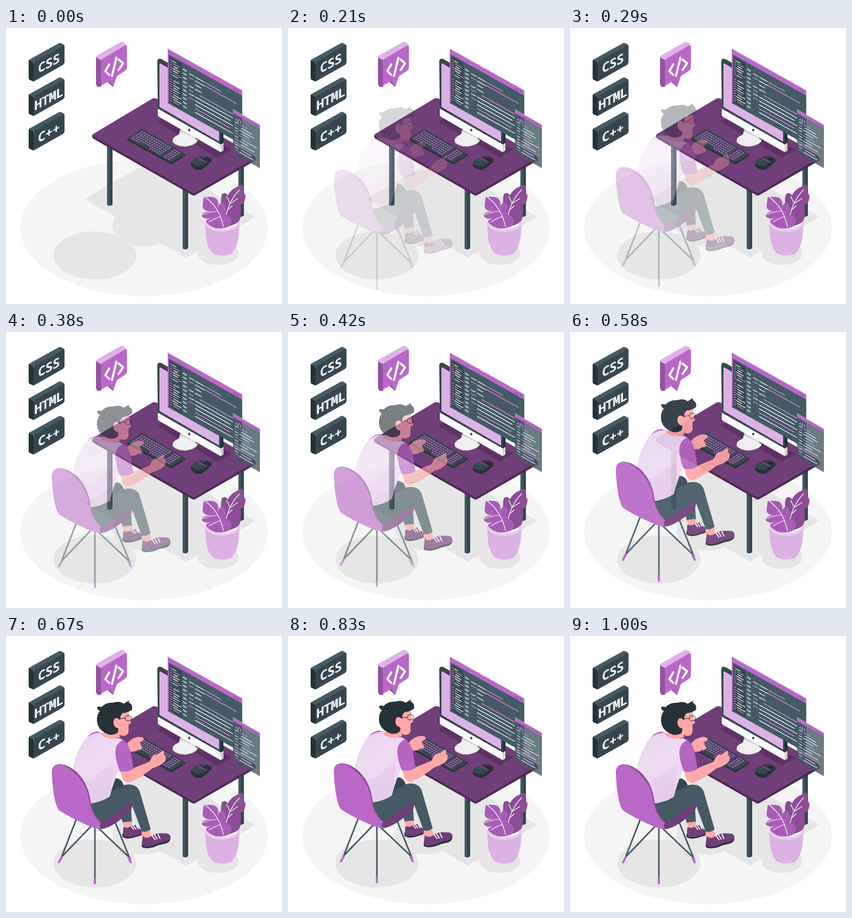
Recreate the animation shown at these times as an HTML page. Size 500 px wide and 500 px high, loop 1.04 s.

```html
<!DOCTYPE html>
<html lang="en">
<head>
<meta charset="utf-8">
<title>Programmer at a desk</title>
<style>
html, body { margin: 0; width: 100%; height: 100%; overflow: hidden; background: #fff; }
svg { display: block; width: 100%; height: 100%; }
.label { font: 900 23px "Noto Sans Mono", "DejaVu Sans Mono", monospace; letter-spacing: -.8px; fill: #fff; text-anchor: middle; }
.line { fill: none; stroke-linecap: round; stroke-linejoin: round; }
</style>
</head>
<body>
<svg viewBox="0 0 500 500">
  <defs>
    <linearGradient id="shirt" x1="0" y1="0" x2=".4" y2="1">
      <stop offset="0" stop-color="#e8d2ed"/><stop offset=".5" stop-color="#eedcf2"/><stop offset="1" stop-color="#ead5ef"/>
    </linearGradient>
    <g id="slab">
      <path fill="#263238" d="M41 60Q41 57 43 58L50 62V97L43 94Q41 93 41 91Z"/>
      <path fill="#455a64" d="M41 58L95 28Q98 26 101 28L106 31L50 63Z"/>
      <path fill="#37474f" d="M50 65Q50 62 53 60L103 32Q106 30 106 33V62Q106 65 103 67L50 97Z"/>
    </g>
    <g id="leg">
      <path fill="#37474f" d="M0 0H10V109Q5 113 0 109Z"/>
      <path fill="#455a64" d="M0 0H4V111Q2 111 0 109Z"/>
    </g>
  </defs>

  <ellipse cx="250" cy="362" rx="224" ry="124" fill="#f5f5f5"/>
  <g fill="#e6e6e6">
    <path d="M142 310L266 238L452 342L326 416Z"/>
    <ellipse cx="250" cy="358" rx="57" ry="38"/>
    <ellipse cx="161" cy="412" rx="75" ry="43.5"/>
    <ellipse cx="384" cy="408" rx="37" ry="21.5"/>
  </g>

  <use href="#slab"/><use href="#slab" y="62.5"/><use href="#slab" y="125"/>
  <g class="label">
    <text transform="translate(77.500 72) skewY(-28)">CSS</text>
    <text transform="translate(77.500 136) skewY(-28)">HTML</text>
    <text transform="translate(77.500 198) skewY(-28)">C++</text>
  </g>

  <g id="bubble">
    <path fill="#9552a0" d="M163 53L173 58V106L168 107Q163 105 163 101ZM184 98L194 107L198 92L190 92Z"/>
    <path fill="#dcb3e3" d="M163 53Q163 51 166 49L207 26Q210 24 213 26L218 29L173 57Z"/>
    <path fill="#ba68c8" d="M172 61Q172 57 176 55L214 32Q219 29 219 34V71Q219 75 215 78L201 87L194 107L187 96L173 104Q169 107 170 106Q172 104 172 102Z"/>
    <path class="line" stroke="#fff" stroke-width="3.800" d="M187 66L180 78L187 85M200 54L192 87M204 57L212 64L204 76"/>
  </g>

  <g id="desk">
    <use href="#leg" x="183" y="211"/>
    <use href="#leg" x="320" y="290"/>
    <use href="#leg" x="421" y="231"/>
    <path fill="#4a2a50" d="M156 194V197Q156 199 159 201L336 302Q340 305 344 302L452 240V233Z"/>
    <path fill="#703e78" d="M158 192L265 128Q269 126 273 128L450 231Q454 234 450 236L344 298Q340 300 336 298L158 196Q155 194 158 192Z"/>
    <path fill="#5d3265" d="M272 169L290 160L408 220L384 235Z"/>
  </g>

  <g id="monitor">
    <path fill="#e0e0e0" d="M302 203V207Q308 214 324 215Q345 212 347 203Z"/>
    <path fill="#f0f0f0" d="M302 203Q302 198 313 193L317 181L345 196L342 200Q350 203 345 207Q334 213 324 213Q306 212 302 203Z"/>
    <path fill="#d5d5d5" d="M317 181L345 196L342 201Q332 194 315 188Z"/>
    <path fill="#263238" d="M388 190L394 186V209L388 212Z"/>
    <path fill="#37474f" d="M274 60Q275 54 281 56L389 118V210L275 147Z"/>
    <path fill="#dbb2e3" d="M278 66Q278 63 281 65L386 125V207L278 146Z"/>
    <path class="line" stroke="#37474f" stroke-width="3" d="M277 144L387 208"/>
    <path fill="#fafafa" d="M275 146L389 211V225L279 162Q275 160 275 157Z"/>
    <path fill="#d0d0d0" d="M389 211L394 208V222L389 225Z"/>
    <circle cx="332" cy="185" r="2" fill="#263238"/>
  </g>

  <g id="editor" transform="matrix(1 .560 0 1 293 38)">
    <path fill="#455a64" d="M0 0H135V98H0Z"/>
    <path fill="#37474f" d="M3 12H25V46H3ZM3 48H25V95H3Z"/>
    <path fill="#ba68c8" d="M0 0H135V9H2V96H0Z"/>
    <path fill="#d79fe0" d="M0 -1H134L135 0H0Z"/>
    <path class="line" stroke="#6f3d78" stroke-width="2.200" d="M120 5h.1M124 5h.1M128 5h.1"/>
  </g>
  <g id="popup" transform="matrix(1 .571 0 1 411 148)">
    <path fill="#455a64" fill-opacity=".8" d="M0 0H49V78H0Z"/>
    <path fill="#ba68c8" d="M0 0H49V6H0Z"/>
    <path fill="#d79fe0" d="M0 -1H49V0H0Z"/>
    <path class="line" stroke="#6f3d78" stroke-width="1.600" d="M38 3.500h.1M41.500 3.500h.1M45 3.500h.1"/>
    <path class="line" stroke="#dbb2e3" stroke-width="1" d="M7 13l-2 2l2 2M11 11l-2 7M13 12l2 2l-2 2"/>
  </g>

  <path fill="#1d272c" d="M220 200V203L298 246Q301 247 303 245L325 231V228Z"/>
  <path fill="#37474f" d="M222 198L244 184Q247 182 250 184L323 227Q326 229 323 231L302 243Q299 245 296 243L222 202Q219 200 222 198Z"/>
  <g id="keys" class="line" stroke="#ba68c8" stroke-width="2"/>

  <path fill="#263238" d="M335 244Q341 235 355 233Q368 232 372 238V242Q362 252 353 257Q342 258 335 250Z"/>
  <path fill="#37474f" d="M335 244Q341 235 351 234L364 243L352 250Q341 251 335 244Z"/>
  <path class="line" stroke="#9552a0" stroke-width="1" d="M346 236L364 243M353 239L360 234"/>

  <g id="plant">
    <path fill="#dbb2e3" d="M361 352C361 379 364 400 376 409Q392 416 408 409C420 399 423 374 423 348Z"/>
    <ellipse cx="392" cy="353" rx="31" ry="16" fill="#e8cfed"/>
    <ellipse cx="392" cy="351" rx="28" ry="13" fill="#fff"/>
    <path fill="#8c4e96" d="M424 285Q430 282 430 291L430 299Q436 302 433 310Q432 319 424 321Q427 327 425 334Q427 345 420 352Q409 360 396 359L391 330Q388 310 391 301Q397 296 402 303Q407 294 414 290Z"/>
    <path class="line" stroke="#fff" stroke-width="1.200" d="M423 293Q401 316 397 349M400 305L406 318L420 309M401 330L410 322"/>
    <path fill="#a75db4" d="M358 307Q370 304 380 308Q387 315 384 323Q387 316 393 317Q400 322 398 332Q398 337 397 339Q407 338 409 349Q409 360 398 362Q374 367 363 352Q361 347 373 344Q360 348 355 341Q354 333 371 332Q357 332 356 323Z"/>
    <path class="line" stroke="#fff" stroke-width="1.200" d="M362 307Q387 326 394 360M357 338Q371 332 383 332M368 351Q380 344 388 342"/>
  </g>

  <g id="coder">
    <g class="line" stroke="#455a64" stroke-width="2.800">
      <path d="M127 333L99 405M154 345L102 399M161 342V444M165 346L223 401M198 338L225 405"/>
      <path stroke="#ba68c8" stroke-width="4" d="M101 401L96 410M161 440V448M222 402L226 410"/>
    </g>

    <path fill="#37474f" d="M186 277Q187 259 201 258Q210 260 213 270L228 338L212 340L204 310Z"/>
    <path fill="#455a64" d="M204 316L226 303L228 336Q221 341 212 339Z"/>
    <path fill="#ffa8a7" d="M211 338L227 336L229 349L217 351Z"/>
    <g id="shoe">
      <path fill="#263238" d="M211 358V364Q217 369 230 366L246 361V356Z"/>
      <path fill="#703e78" d="M213 346Q220 350 226 345L236 342Q239 349 246 352Q247 358 241 360Q224 367 213 363Q211 354 213 346Z"/>
      <path class="line" stroke="#fff" stroke-width="1.800" d="M227 345l4 5M231 344l4 6M236 343l3 6"/>
    </g>

    <path fill="#455a64" d="M146 298Q160 296 184 289Q198 276 215 270Q235 266 242 281L262 350Q256 357 246 355L228 306L176 340L160 332Z"/>
    <path class="line" stroke="#37474f" stroke-width="1" d="M190 282Q204 274 218 274"/>
    <path fill="#ffa8a7" d="M246 354Q254 357 261 351L263 363L250 369L245 363Z"/>
    <path fill="#263238" d="M246 377V382Q251 387 267 383Q278 378 290 376Q298 373 298 366Z"/>
    <path fill="#703e78" d="M248 363Q255 369 264 362L273 358Q283 357 293 358Q299 361 298 367Q293 373 281 374Q267 381 254 382Q246 381 246 375Z"/>
    <path class="line" stroke="#fff" stroke-width="1.900" d="M264 361l6 8M269 360l5 8M275 359l4 8"/>

    <path fill="#ffa8a7" d="M218 197Q226 185 239 183Q248 182 250 187Q249 190 242 193L247 203Q245 207 239 206L236 209L226 210Z"/>
    <path fill="#ba68c8" d="M145 187Q151 175 165 173L177 177L174 194Z"/>
    <path fill="url(#shirt)" d="M148 183Q160 174 173 176Q187 189 205 185L214 190L201 207L205 241Q195 265 188 291Q174 301 150 304L119 251Q124 219 135 201Q140 189 148 183Z"/>
    <path fill="#e3c5e9" d="M119 251Q138 272 160 257Q181 237 194 234Q195 255 188 291Q174 301 150 304Z" opacity=".5"/>
    <path fill="#ffa8a7" d="M173 176L203 173L207 183Q190 191 173 180Z"/>
    <path fill="#ffa8a7" d="M207 245L230 240L260 228Q266 213 274 215L284 208Q288 208 286 214Q291 220 288 227Q282 235 265 240Q243 258 223 266Q213 266 210 256Z"/>
    <path class="line" stroke="#f28f8f" stroke-width="1" d="M272 222L279 217L286 214M230 241L235 239"/>
    <path fill="#b566c3" d="M199 203Q203 192 212 189Q221 193 226 211L231 241Q219 248 206 245Q199 228 198 211Z"/>

    <path fill="#ffa8a7" d="M199 145L222 136Q224 146 224 151L227 157L222 161L222 174Q220 182 211 181L197 177Z"/>
    <path fill="#263238" d="M165 129Q169 127 173 129Q181 120 194 121Q206 117 213 123L223 117Q221 121 226 123Q230 128 228 134Q221 139 211 140Q206 145 207 152L203 160L204 173Q200 180 187 179Q171 174 166 161Q162 146 170 136Q165 134 165 129Z"/>
    <path fill="#ffa8a7" d="M206 152Q200 146 196 151Q192 160 199 166L204 168L202 178L212 179L213 154Z"/>
    <path class="line" stroke="#f28f8f" stroke-width="1" d="M198 154Q202 153 202 160"/>
    <path class="line" stroke="#263238" stroke-width="1" d="M207 150L216 149M219 145Q226 143 227 148Q227 153 222 154Q216 154 216 149Q216 146 219 145"/>

    <path fill="#703e78" d="M165 339Q184 336 200 320L229 302Q230 314 222 320Q195 346 174 350L162 347Z"/>
    <path fill="#8c4e96" d="M95 232C128 234 147 267 151 288C155 313 160 327 174 339L166 342L140 290Z"/>
    <path fill="#ba68c8" d="M83 249C82 235 92 229 105 235C127 246 144 267 149 289C153 315 159 328 172 339Q168 344 172 350Q158 349 143 341Q116 329 96 316C88 306 84 273 83 249Z"/>
  </g>
</svg>

<script>
const NS = "http://www.w3.org/2000/svg";
const LOOP = 1040, FPS = 24, LEAD = 0.02, RISE = 30;
const WHITE = "#fff", LILAC = "#d48ce0", GREY = "#a9b3b8";
const coder = document.getElementById("coder");

function stroke(parent, d, color, width) {
  const path = document.createElementNS(NS, "path");
  const attrs = { d, stroke: color, "stroke-width": width, class: "line" };
  for (const name in attrs) path.setAttribute(name, attrs[name]);
  parent.append(path);
}

function drawEditor() {
  const editor = document.getElementById("editor");
  const code = (x, y, w, color) => stroke(editor, `M${x} ${y}h${w}`, color, 1.4);
  for (let i = 0; i < 18; i++) {
    const y = 17 + i * 4.3;
    if (i === 7) continue;
    code(5, y, 2, GREY);
    code(9 + i % 3, y, 6 + i * 5 % 9, i % 4 === 1 ? LILAC : WHITE);
  }
  for (let i = 0; i < 10; i++) stroke(editor, `M29 ${21 + i * 7.4}h4`, GREY, 3.4);
  const openings = [
    [39, 23, 9, WHITE], [51, 23, 14, WHITE], [67, 23, 29, LILAC],
    [39, 30, 7, LILAC], [50, 30, 15, WHITE],
    [50, 37, 10, WHITE], [66, 29, 58, LILAC],
    [39, 45, 7, WHITE], [50, 45, 11, WHITE],
    [39, 52, 7, LILAC], [58, 52, 66, LILAC],
    [39, 59, 8, WHITE], [39, 66, 8, LILAC]
  ];
  openings.forEach(row => code(...row));
  for (let i = 0; i < 5; i++) code(50, 59 + i * 7, 68 - i % 2 * 5, i === 3 ? LILAC : WHITE);
}

function drawPopup() {
  const popup = document.getElementById("popup");
  for (let i = 0; i < 11; i++) {
    const y = 20 + i * 5, color = i % 3 === 1 ? LILAC : WHITE;
    stroke(popup, `M4 ${y}h5`, color, 1.1);
    stroke(popup, `M${12 + i % 2 * 3} ${y}h${12 + i * 7 % 19}`, i % 4 ? WHITE : LILAC, 1.1);
  }
}

function drawKeys() {
  const keys = document.getElementById("keys");
  let d = "";
  for (let row = 0; row < 6; row++) {
    for (let col = 0; col < 17; col++) {
      if (col === 13 || row === 5 && col > 3 && col < 8) continue;
      const x = 246.5 + col * 4.18 - row * 3.75, y = 187.5 + col * 2.4 + row * 2.3;
      d += `M${x.toFixed(1)} ${y.toFixed(1)}l1.500 .860`;
    }
  }
  keys.innerHTML = `<path d="${d}"/>`;
}

// cubic-bezier(.36, -.01, .5, 1.38), solved for x by bisection
function overshoot(x) {
  if (x >= 1) return 1;
  const curve = (s, a, b) => 3 * (1 - s) * s * ((1 - s) * a + s * b) + s ** 3;
  let low = 0, high = 1;
  for (let i = 0; i < 24; i++) {
    const mid = (low + high) / 2;
    if (curve(mid, 0.36, 0.5) < x) low = mid; else high = mid;
  }
  return curve(low, -0.01, 1.38);
}

function render(ms) {
  const step = Math.floor((ms % LOOP + 4) * FPS / 1000);
  const p = step % 25 ? overshoot(step / FPS + LEAD) : 0;
  coder.setAttribute("opacity", Math.min(1, Math.max(0, p)));
  coder.setAttribute("transform", `translate(0 ${RISE * (1 - p)})`);
}

drawEditor();
drawPopup();
drawKeys();
const start = performance.now();
function tick() {
  render(performance.now() - start);
  requestAnimationFrame(tick);
}
render(0);
requestAnimationFrame(tick);
</script>
</body>
</html>
```
